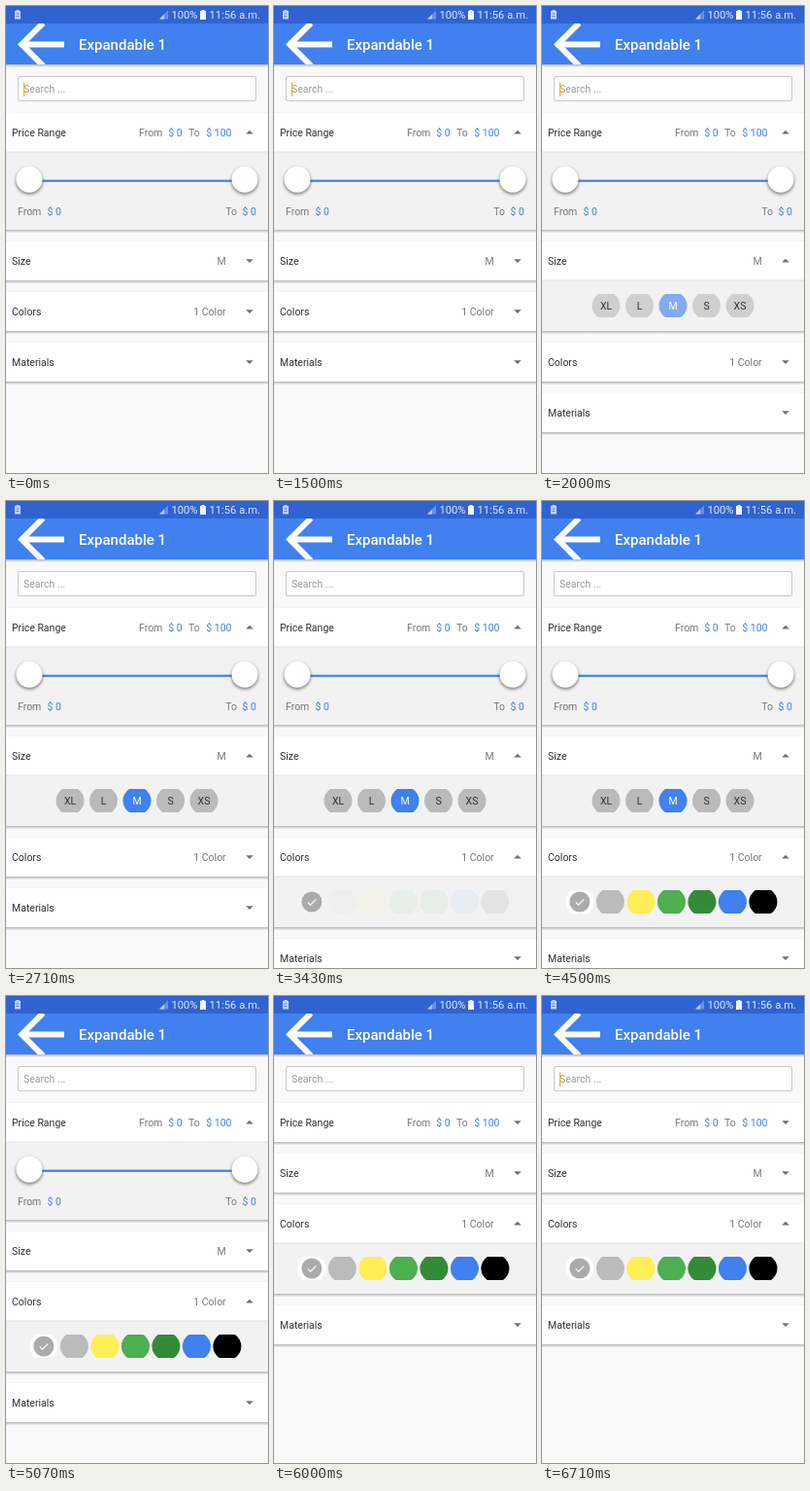
An HTML page that plays this animation: 270x480 px, repeating every 7 s.

```html
<!DOCTYPE html>
<html lang="en">
<head>
<meta charset="utf-8">
<title>Expandable list</title>
<style>
  html, body { margin: 0; width: 100%; height: 100%; overflow: hidden; background: #f9f9f9; }
  svg { display: block; width: 100vw; height: 100vh; font: 10.5px Roboto, sans-serif; }
  text { white-space: pre; }
  .dark { fill: #303030; }
  .grey { fill: #777; }
  .blue { fill: #4080e8; }
  .end { text-anchor: end; }
  .mid { text-anchor: middle; }
  .status { font-size: 11.2px; fill: #dfe8fa; }
</style>
</head>
<body>
<svg viewBox="0 0 270 480">
  <defs>
    <clipPath id="barClip"><rect y="18" width="270" height="42"/></clipPath>
    <filter id="soft" x="-40%" y="-40%" width="180%" height="180%"><feGaussianBlur stdDeviation="1.5"/></filter>
    <linearGradient id="fall" x1="0" y1="0" x2="0" y2="1">
      <stop offset="0" stop-color="#000" stop-opacity=".27"/>
      <stop offset="1" stop-color="#000" stop-opacity="0"/>
    </linearGradient>
    <path id="pill" d="M-8-12H8A14.3 14.3 0 0 1 8 12H-8A14.3 14.3 0 0 1-8-12Z"/>
    <g id="thumb">
      <circle cy="1.6" r="14" fill="#000" opacity=".42" filter="url(#soft)"/>
      <circle r="13.5" fill="#fff"/>
    </g>
  </defs>

  <rect width="270" height="480" fill="#f9f9f9"/>

  <rect x="12.5" y="72.5" width="245" height="25" rx="1.5" fill="#fff" stroke="#c8c8c8"/>
  <text x="18" y="89" fill="#9a9a9a">Search ...</text>
  <rect id="caret" x="17.8" y="78.5" width="1.5" height="14.5" fill="#f6b91c"/>

  <g id="cards"></g>

  <rect y="60" width="270" height="3" fill="url(#fall)"/>
  <rect y="17" width="270" height="43" fill="#4081ef"/>
  <rect width="270" height="18" fill="#3063d2"/>
  <g clip-path="url(#barClip)">
    <path transform="translate(0 3.5) scale(3)" fill="#fff"
      d="M20 11H7.83l5.59-5.59L12 4l-8 8 8 8 1.41-1.41L7.83 13H20z"/>
  </g>
  <text x="75" y="45" font-size="15" font-weight="500" fill="#fff">Expandable 1</text>

  <g fill="#c3d3f5">
    <path d="M10.5 4h3v1H15v8.5H9V5h1.5z"/>
    <path d="M10.5 8h3M10.5 10.5h3" stroke="#5f86dc"/>
    <path d="M158 13.5L167 4.5V13.5Z" opacity=".4"/>
    <path d="M158 13.5L163 8.5V13.5Z" opacity=".85"/>
    <path d="M201.5 4h3v1H206v9H200V5h1.5z" fill="#f2f5fe"/>
  </g>
  <text class="status" x="170.5" y="13">100%</text>
  <text class="status" x="209.5" y="13">11:56 a.m.</text>
</svg>
<script>
const LOOP = 7000, TOP = 110, HEAD = 40, GAP = 12;
const FADE = 430, FADE_DELAY = 182;
const BLINKS = [710, 1110, 1550, 1990, 2430, 2870, 3310, 3750, 4190, 4630, 5070, 6710];
const UP = "M247.2 21.5H254.8L251 17.7Z", DOWN = "M247.2 18.2H254.8L251 22Z";

const text = (x, y, s, cls) => `<text x="${x}" y="${y}" class="${cls}">${s}</text>`;
const pill = (x, fill) => `<use href="#pill" x="${x}" y="66" fill="${fill}" class="fade"/>`;

const priceBody =
  '<rect x="24" y="68.6" width="222" height="2.2" fill="#4080e8"/>' +
  [24, 246].map(x => `<use href="#thumb" x="${x}" y="68.3"/>`).join("") +
  text(12, 105.4, "From", "grey") + text(42.5, 105.4, "$ 0", "blue") +
  text(238, 105.4, "To", "grey end") + text(258, 105.4, "$ 0", "blue end");

const sizeBody = ["XL", "L", "M", "S", "XS"].map((s, i) => {
  const x = 66 + i * 34.5, on = s === "M";
  return pill(x, on ? "#4081ef" : "#bababa") +
    `<text x="${x}" y="70" class="mid" fill="${on ? "#fff" : "#303030"}">${s}</text>`;
}).join("");

const colorBody =
  ["#fff", "#bbb", "#ffee55", "#4caf50", "#348b37", "#4081ef", "#000"]
    .map((c, i) => pill(38.9 + i * 31.5, c)).join("") +
  '<circle cx="38.9" cy="66" r="10.5" fill="#ababab"/>' +
  '<path d="M34.7 66.3L37.6 69.2 43.3 63.3" fill="none" stroke="#fff" stroke-width="1.1"/>';

const cards = [
  { name: "Price Range", body: priceBody, height: 80, open: 0, close: 5640,
    info: text(137, 24, "From", "grey") + text(167.3, 24, "$ 0", "blue") +
          text(188, 24, "To", "grey") + text(232.5, 24, "$ 100", "blue end") },
  { name: "Size", body: sizeBody, height: 52, open: 1570, close: 4570,
    info: text(226.7, 24, "M", "grey end") },
  { name: "Colors", body: colorBody, height: 52, open: 3180, close: LOOP,
    info: text(226.7, 24, "1 Color", "grey end") },
  { name: "Materials", body: "", height: 0, open: LOOP, close: LOOP, info: "" }
];

const caret = document.getElementById("caret");
const list = document.getElementById("cards");
list.innerHTML = cards.map(c => `<g>
  <rect class="shadow" width="270" height="3.5" fill="url(#fall)"/>
  <rect y="-.5" width="270" height=".5" fill="#eee"/>
  <rect width="270" height="${HEAD}" fill="#fff"/>
  ${text(6, 24, c.name, "dark")}${c.info}
  <path class="arrow" fill="#707070"/>
  <g class="body">
    <rect y="${HEAD}" width="270" height="${c.height}" fill="#f2f2f2"/>
    <rect y="${HEAD - 0.5}" width="270" height="1" fill="#e3e3e3"/>
    ${c.body}
  </g></g>`).join("");

cards.forEach((c, i) => {
  c.node = list.children[i];
  c.shadow = c.node.querySelector(".shadow");
  c.arrow = c.node.querySelector(".arrow");
  c.panel = c.node.querySelector(".body");
  c.fades = c.node.querySelectorAll(".fade");
});

function ease(p) {
  p = Math.min(1, Math.max(0, p));
  return (1 - Math.cos(Math.PI * p)) / 2;
}

function render(t) {
  let y = TOP;
  for (const c of cards) {
    const open = t >= c.open && t < c.close;
    const height = HEAD + (open ? c.height : 0);
    const alpha = ease((t - c.open - FADE_DELAY) / FADE);
    c.node.setAttribute("transform", `translate(0 ${y})`);
    c.shadow.setAttribute("y", height);
    c.arrow.setAttribute("d", open ? UP : DOWN);
    c.panel.setAttribute("display", open ? "inline" : "none");
    c.fades.forEach(f => f.setAttribute("opacity", alpha));
    y += height + GAP;
  }
  const flips = BLINKS.filter(b => t >= b).length;
  caret.setAttribute("opacity", flips % 2 ? 0 : 1);
}

const start = performance.now();
function tick() {
  render((performance.now() - start) % LOOP);
  requestAnimationFrame(tick);
}
render(0);
requestAnimationFrame(tick);
</script>
</body>
</html>
```
